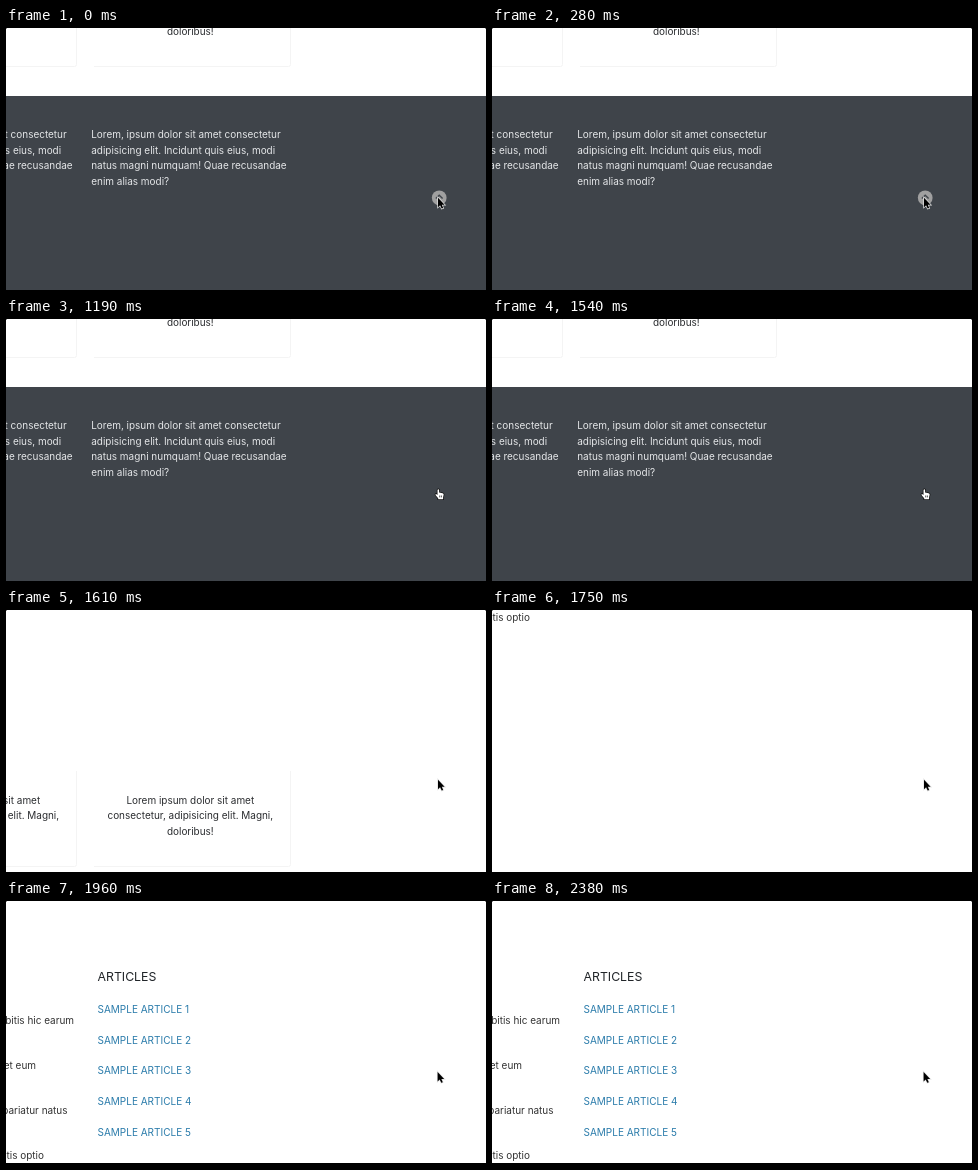
Animation, 480 px wide and 263 px high, one loop 2.45 s. Source, as an HTML page with a canvas:

```html
<!DOCTYPE html>
<html lang="en">
<head>
<meta charset="utf-8">
<title>Scroll to top</title>
<style>
html, body { margin: 0; width: 100%; height: 100%; overflow: hidden; background: #fff; }
canvas { display: block; width: 480px; height: 263px; }
</style>
</head>
<body>
<canvas id="stage" width="480" height="263"></canvas>
<script>
const ctx = document.getElementById('stage').getContext('2d');
const LOOP = 2450, STEP = 70, TRAVEL = 1440, COLUMN = 214, LINE = 15.5;
const FOOTER = '#3f444a';
const cardText = ['Lorem ipsum dolor sit amet', 'consectetur, adipisicing elit. Magni,', 'doloribus!'];
const footerText = ['Lorem, ipsum dolor sit amet consectetur', 'adipisicing elit. Incidunt quis eius, modi',
  'natus magni numquam! Quae recusandae', 'enim alias modi?'];
const paragraphEnds = [['debitis hic earum', 68], ['et eum', 30], ['pariatur natus', 61.5], ['veritatis optio', 38]];
const arrow = new Path2D('M0 0V9.4L2.1 7.5L3.7 10.8L5.2 10.2L3.8 7H6.6Z');
const hand = new Path2D('M2.1 1Q2.1 0 2.9 0T3.7 1V3.4L7.2 4Q8.4 4.3 8.3 5.5L7.7 8V10H2.8V9L.2 6Q-.3 4.9 .7 4.8L2.1 5.8Z');
const knuckles = new Path2D('M4.3 6.3V8.2M6 6.3V8.2');

const ramp = (t, start, length) => Math.min(1, Math.max(0, (t - start) / length));
const smooth = u => u * u * (3 - 2 * u);

function rect(x, y, w, h, color) {
  ctx.fillStyle = color;
  ctx.fillRect(x, y, w, h);
}

function text(str, x, y, color, size = 9.96, align = 'left') {
  ctx.font = `${size}px Inter, "Open Sans", sans-serif`;
  ctx.textAlign = align;
  ctx.fillStyle = color;
  ctx.fillText(str, x, y);
}

function stroke(path, color, width) {
  ctx.strokeStyle = color;
  ctx.lineWidth = width;
  ctx.stroke(path);
}

function pointer(path, x, y, fill, outline, details) {
  ctx.save();
  ctx.translate(x, y);
  stroke(path, outline, 1.4);
  ctx.fillStyle = fill;
  ctx.fill(path);
  if (details) stroke(details, outline, 0.7);
  ctx.restore();
}

function pageTop() {
  text('ARTICLES', 91.5, 79.6, '#212529', 12.3);
  for (let i = 0; i < 5; i++) text(`SAMPLE ARTICLE ${i + 1}`, 91.5, 111.7 + i * 30.85, '#2b7cab', 10);
  paragraphEnds.forEach(([str, end], i) => text(str, end, 122.6 + i * 45, '#333', 9.96, 'right'));
}

function pageBottom() {
  rect(0, 68, 480, 400, FOOTER);
  const cardEdge = new Path2D('M284.5 -57V36.5Q284.5 38.5 282.5 38.5H88');
  for (const dx of [-COLUMN, 0]) {
    ctx.save();
    ctx.translate(dx, 0);
    stroke(cardEdge, '#f4f4f4', 1);
    cardText.forEach((str, i) => text(str, 184.3, -24.3 + i * LINE, '#2b2d30', 9.96, 'center'));
    footerText.forEach((str, i) => text(str, 85.2, 110.4 + i * LINE, '#e4e6e8'));
    ctx.restore();
  }
}

// Back-to-top button, fading away under the pointer.
function button(t) {
  ctx.save();
  ctx.globalAlpha = 1 - ramp(t, 420, 350);
  ctx.fillStyle = '#a0a0a0';
  ctx.beginPath();
  ctx.arc(433.2, 169.8, 7.4, 0, 7);
  ctx.fill();
  stroke(new Path2D('M429.8 170.6L433.2 167.2L436.6 170.6'), FOOTER, 1.4);
  ctx.restore();
}

function draw(now) {
  const t = Math.floor(now % LOOP / STEP) * STEP;
  const scroll = Math.round(TRAVEL * smooth(ramp(t, 1540, 285)));
  rect(0, 0, 480, 263, '#fff');
  ctx.save();
  ctx.translate(0, scroll);
  pageBottom();
  ctx.translate(0, -TRAVEL);
  pageTop();
  ctx.restore();

  if (t < 1610) button(t);
  if (t >= 560 && t < 1610) pointer(hand, 429.4, 170.2, '#fff', t < 1050 ? '#2a2c31' : '#0c0c0c', knuckles);
  else pointer(arrow, t < 1820 ? 432 : 431.6, t < 1820 ? 169.8 : 171, '#000', '#e4e4e4');

  rect(0, 262, 480, 1, '#000');
  for (const x of [0, 479]) rect(x, 0, 1, 1, '#888');
}

function tick() {
  draw(performance.now());
  requestAnimationFrame(tick);
}
tick();
</script>
</body>
</html>
```
